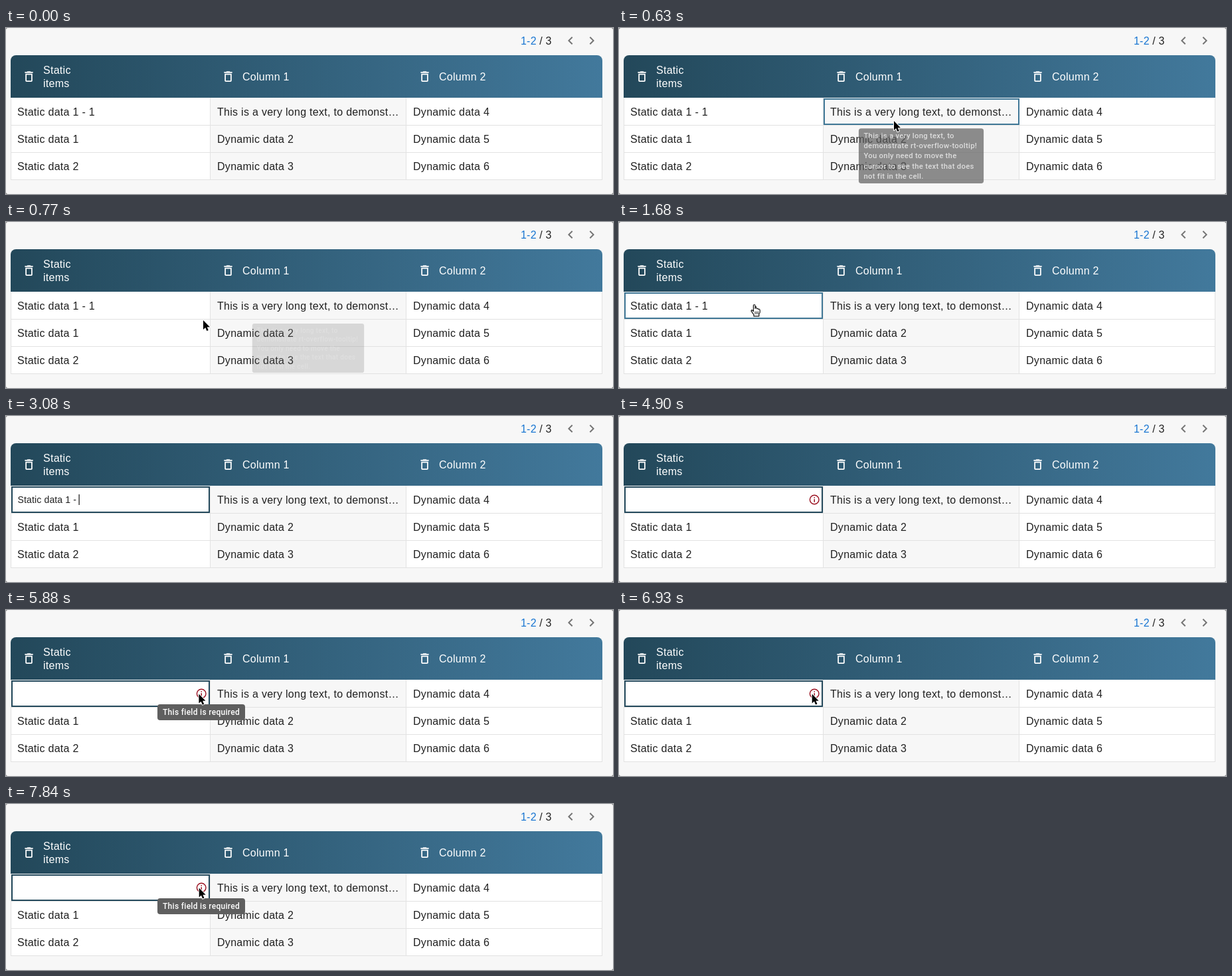
Animation, 914 px wide and 250 px high, one loop 8000 ms. Source, as an HTML page with a canvas:

```html
<!DOCTYPE html>
<html lang="en">
<head>
<meta charset="utf-8">
<title>Editable table</title>
<style>
  html, body { margin: 0; width: 100%; height: 100%; overflow: hidden; background: #f7f7f7; }
  canvas { display: block; width: 914px; height: 250px; }
</style>
</head>
<body>
<canvas id="stage" width="914" height="250"></canvas>
<script>
const canvas = document.getElementById('stage');
const ctx = canvas.getContext('2d');
const LOOP = 8000, STEP = 70;
const SANS = '"Liberation Sans", Arial, sans-serif';
const CELL_FONT = '16px ' + SANS;
const INPUT_FONT = '14px ' + SANS;
const TIP_FONT = '500 12px Roboto, sans-serif';
const INK = '#212121';
const HOVER = '#3f7796', FOCUS = '#24495c';

const VALUE = 'Static data 1 - 1';
const EDIT_START = 2030;
const DELETIONS = [2730, 3220, 3290, 3430, 3500, 3570, 3640, 3780, 3850,
                   3920, 3990, 4130, 4200, 4270, 4410, 4480, 4550];
const ROWS = [
  ['', 'This is a very long text, to demonst…', 'Dynamic data 4'],
  ['Static data 1', 'Dynamic data 2', 'Dynamic data 5'],
  ['Static data 2', 'Dynamic data 3', 'Dynamic data 6']
];
const COLUMNS = [17, 318, 613];
const LONG_TIP = ['This is a very long text, to', 'demonstrate rt-overflow-tooltip!',
                  'You only need to move the', 'cursor to see the text that does', 'not fit in the cell.'];

const TRASH = new Path2D('M6 19c0 1.1.9 2 2 2h8c1.1 0 2-.9 2-2V7H6v12zM8 9h8v10H8V9zm7.5-5l-1-1h-5l-1 1H5v2h14V4z');
const LEFT = new Path2D('M15.41 7.41 14 6l-6 6 6 6 1.41-1.41L10.83 12z');
const RIGHT = new Path2D('M10 6 8.59 7.41 13.17 12l-4.58 4.59L10 18l6-6z');
const ARROW = new Path2D('M0 0V14L3.2 11.1 5.4 16.1 7.8 15.1 5.7 10.2H10z');
const HAND = new Path2D('M-1.6 1.2Q-1.6 0 -.3 0T1 1.2V6Q2-.2 3.4 6.2 4.8 5 5.8 7 7.6 6 8.2 8.2V11.5L6.8 14.5V17.4H-1V15.2L-4.9 9.6Q-5 7.6-3.2 8.4L-1.6 10z');
const IBEAM = new Path2D('M-3.5-9Q-.3-9 0-7.2.3-9 3.5-9M0-7.2V7.2M-3.5 9Q-.3 9 0 7.2.3 9 3.5 9M-2 3H2');

const clamp = v => Math.max(0, Math.min(1, v));
const mix = (a, b, p) => a + (b - a) * p;
const smooth = p => p * p * (3 - 2 * p);

function text(str, x, y, color = INK, font = CELL_FONT, spacing = 0.286) {
  ctx.font = font;
  ctx.letterSpacing = spacing + 'px';
  ctx.fillStyle = color;
  ctx.fillText(str, x, y);
}

function shifted(x, y, scale, draw) {
  ctx.save();
  ctx.translate(x, y);
  ctx.scale(scale, scale);
  draw();
  ctx.restore();
}

function icon(path, x, y, scale, color) {
  shifted(x, y, scale, () => { ctx.fillStyle = color; ctx.fill(path); });
}

function roundRect(x, y, w, h, radii, fill) {
  ctx.beginPath();
  ctx.roundRect(x, y, w, h, radii);
  ctx.fillStyle = fill;
  ctx.fill();
}

function outline(x, w, color) {
  ctx.strokeStyle = color;
  ctx.lineWidth = 2;
  ctx.strokeRect(x + 1, 107, w - 2, 38);
}

function drawTable() {
  ctx.fillStyle = '#777';
  ctx.fillRect(0, 0, 914, 250);
  roundRect(0, 0, 914, 250, 3, '#f7f7f7');

  const shade = ctx.createLinearGradient(7, 0, 898, 0);
  shade.addColorStop(0, '#23485a');
  shade.addColorStop(1, '#42799c');
  roundRect(7, 41, 891, 64, [8, 8, 0, 0], shade);
  for (const x of [34.5, 334.5, 630.5]) icon(TRASH, x - 10.5, 62.5, 0.875, '#fff');
  text('Static', 56, 69, '#fff');
  text('items', 56, 89, '#fff');
  text('Column 1', 356, 79, '#fff');
  text('Column 2', 652, 79, '#fff');

  text('1-2', 775, 25, '#1976d2', CELL_FONT, 0.2);
  text('/ 3', 803.3, 25, INK, CELL_FONT, 0.2);
  icon(LEFT, 838, 7, 1, '#757575');
  icon(RIGHT, 870, 7, 1, '#757575');

  ctx.fillStyle = '#fff';
  ctx.fillRect(7, 105, 891, 124);
  ctx.fillStyle = '#f7f7f7';
  ctx.fillRect(308, 105, 295, 124);
  ctx.fillStyle = '#e2e2e2';
  for (const y of [146, 187, 228]) ctx.fillRect(7, y, 891, 1);
  for (const x of [7, 307, 602, 897]) ctx.fillRect(x, 105, 1, 124);
  ROWS.forEach((row, r) => row.forEach((label, c) => text(label, COLUMNS[c], 132 + 41 * r)));
}

function drawFirstCell(t) {
  if (t < EDIT_START) {
    if (t >= 910) outline(8, 299, HOVER);
    text(VALUE, 17, 132);
    return;
  }
  outline(8, 299, FOCUS);
  const deleted = DELETIONS.filter(at => at <= t).length;
  const value = VALUE.slice(0, VALUE.length - deleted);
  text(value, 17.5, 131, INK, INPUT_FONT, 0.15);
  if ((t - EDIT_START) % 1050 < 560) {
    const x = Math.round(17.5 + ctx.measureText(value).width);
    ctx.fillStyle = '#111';
    ctx.fillRect(x - 0.5, 118, 1.2, 16);
  }
  drawError(clamp((t - 4620) / 280));
}

function drawError(alpha) {
  if (!alpha) return;
  ctx.save();
  ctx.globalAlpha = alpha;
  ctx.strokeStyle = ctx.fillStyle = '#9a1020';
  ctx.lineWidth = 1.4;
  ctx.beginPath();
  ctx.arc(294.2, 126, 6.8, 0, 7);
  ctx.stroke();
  ctx.fillRect(293.5, 122.2, 1.5, 1.5);
  ctx.fillRect(293.5, 125.2, 1.5, 4.6);
  ctx.restore();
}

// Grows in over 150 ms, shrinks out over 100 ms.
function tooltip(t, show, hide, box, originY, lines) {
  if (t < show || t >= hide + 100) return;
  const p = t < hide ? 1 - (1 - clamp((t - show) / 150)) ** 3 : 1 - (t - hide) / 100;
  const [x, y, w, h] = box;
  const cx = x + w / 2, scale = 0.8 + 0.2 * p;
  ctx.save();
  ctx.globalAlpha = p;
  ctx.translate(cx, originY);
  ctx.scale(scale, scale);
  ctx.translate(-cx, -originY);
  roundRect(x, y, w, h, 4, '#5f5f5f');
  lines.forEach((line, i) => text(line, x + 8, y + 16.2 + 16 * i, '#fff', TIP_FONT, 0.3));
  ctx.restore();
}

// Keys are [time, x, y].
function along(keys, t, ease = p => p) {
  let i = 1;
  while (i < keys.length - 1 && keys[i][0] < t) i++;
  const [a, b] = [keys[i - 1], keys[i]];
  const p = ease(clamp((t - a[0]) / (b[0] - a[0])));
  return [mix(a[1], b[1], p), mix(a[2], b[2], p)];
}

const ENTER = [[70, 657, 72], [140, 592, 126], [210, 510, 154], [280, 440, 147], [350, 414, 140],
               [630, 414, 140], [700, 362, 146], [770, 297, 148]];
const TO_CELL = [[770, 297, 148], [1400, 204, 126.5], [1540, 204, 125.5], [1680, 204, 124.5]];
const IN_FIELD = [[2170, 207, 128.5], [2310, 207, 126.5]];
const TO_ICON = [[5180, 207, 126], [5670, 289, 127], [5950, 290.7, 126.5], [6440, 290.7, 126.5],
                 [6650, 272, 127], [6720, 272, 127], [6930, 290.7, 126.5]];

function pointer(kind, x, y) {
  shifted(x, y, 1, () => {
    ctx.lineJoin = ctx.lineCap = 'round';
    if (kind === 'arrow') {
      ctx.strokeStyle = '#fff';
      ctx.lineWidth = 2;
      ctx.stroke(ARROW);
      ctx.fillStyle = '#000';
      ctx.fill(ARROW);
    } else if (kind === 'hand') {
      ctx.fillStyle = '#fff';
      ctx.fill(HAND);
      ctx.strokeStyle = '#111';
      ctx.lineWidth = 1.2;
      ctx.stroke(HAND);
      ctx.beginPath();
      for (const dx of [1, 3.2, 5.4]) { ctx.moveTo(dx, 10.5); ctx.lineTo(dx, 14); }
      ctx.lineWidth = 0.9;
      ctx.stroke();
    } else {
      for (const [color, width] of [['#fff', 2.6], ['#111', 1.1]]) {
        ctx.strokeStyle = color;
        ctx.lineWidth = width;
        ctx.stroke(IBEAM);
      }
    }
  });
}

function drawPointer(t) {
  if (t < 70 || (t >= 2730 && t < 5180)) return;
  if (t <= 770) return pointer('arrow', ...along(ENTER, t));
  if (t < EDIT_START) {
    if (t >= 1890) {
      ctx.beginPath();
      ctx.arc(204, 124, 32, 0, 7);
      ctx.fillStyle = 'rgba(120,120,120,0.3)';
      ctx.fill();
    }
    return pointer(t < 980 ? 'arrow' : 'hand', ...along(TO_CELL, t, smooth));
  }
  if (t < 2730) return pointer('beam', ...along(IN_FIELD, t));
  const [x, y] = along(TO_ICON, t, smooth);
  pointer(x > 284 ? 'arrow' : 'beam', x, y);
}

function render(t) {
  drawTable();
  drawFirstCell(t);
  if (t >= 630 && t < 770) outline(308, 295, HOVER);
  tooltip(t, 580, 691, [355, 150, 200, 88], 169, LONG_TIP);
  for (const [show, hide] of [[5700, 6490], [6940, 9000]])
    tooltip(t, show, hide, [228, 142, 132, 24], 154, ['This field is required']);
  drawPointer(t);
}

const start = performance.now();
function tick() {
  const t = (performance.now() - start) % LOOP;
  render(Math.floor(t / STEP) * STEP);
  requestAnimationFrame(tick);
}
tick();
</script>
</body>
</html>
```
